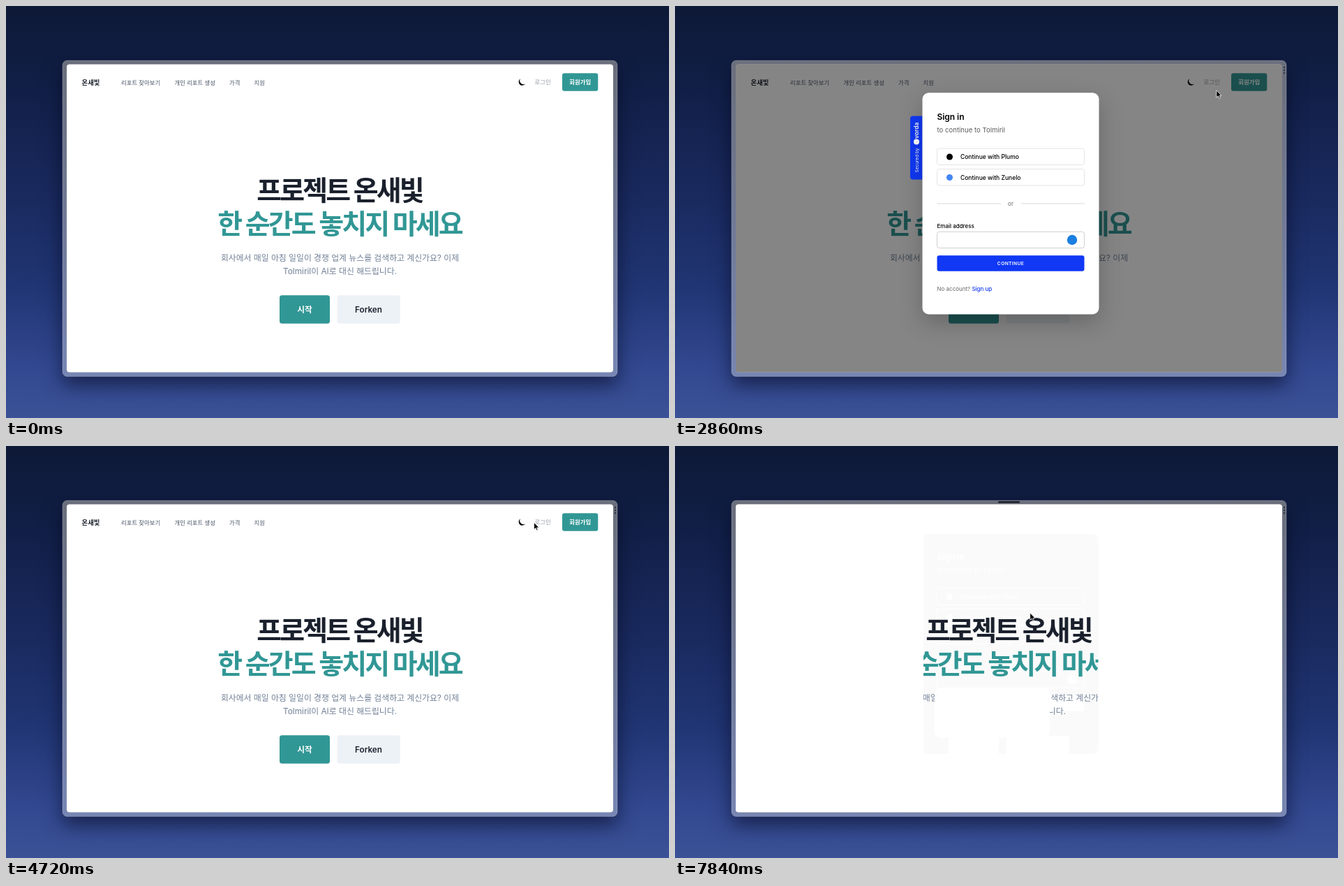
Animation of 950x590 px, one loop 8000 ms. Source, as an HTML page:

```html
<!DOCTYPE html>
<html lang="ko">
<head>
<meta charset="utf-8">
<title>프로젝트 온새빛</title>
<style>
  html, body { margin: 0; width: 100%; height: 100%; overflow: hidden; background: #0e1a3a; }
  svg { display: block; width: 950px; height: 590px; }
  text { font-family: Inter, "Noto Sans CJK KR", "Noto Sans CJK", sans-serif; white-space: pre; }
  .mid { text-anchor: middle; }
  .nav { font-size: 8.4px; font-weight: 500; fill: #4a5568; }
  .hero { font-size: 39px; font-weight: 700; letter-spacing: -2.85px; text-anchor: middle; }
  .lead { font-size: 11.85px; fill: #718096; text-anchor: middle; }
  .button { font-weight: 600; font-size: 11.7px; text-anchor: middle; }
  .card { fill: #fff; filter: drop-shadow(0 12px 16px rgba(0, 0, 0, .22)); }
  .title { font-size: 12px; font-weight: 600; letter-spacing: -.05px; }
  .sub { font-size: 9.6px; fill: #5c5c5c; }
  .box { fill: #fff; stroke: #e4e4e4; }
  .field { fill: #fff; stroke: #cfcfcf; }
  .social { font-size: 8.5px; font-weight: 500; }
  .label { font-size: 8px; font-weight: 500; }
  .small { font-size: 8px; fill: #666; }
  .link { fill: #1038f5; font-weight: 500; }
  .primary, .tab { fill: #1038f5; }
  .submit { font-size: 6.7px; font-weight: 600; letter-spacing: .35px; fill: #fff; text-anchor: middle; }
  .rule { stroke: #d8d8d8; }
  .entry { font-size: 8.8px; font-weight: 500; fill: #fff; }
  .address { font-size: 7.5px; fill: #b9b9b9; }
  .ghost * { fill: #fff; }
  .ghost .card { fill: #fafafa; filter: none; }
  .ghost .tab, .ghost .badge { display: none; }
  .ghost .box, .ghost .field, .ghost .rule { stroke: #fff; fill: none; }
</style>
</head>
<body>
<svg viewBox="0 0 950 590">
  <defs>
    <linearGradient id="sky" x2="0" y2="1">
      <stop offset="0" stop-color="#0d1936"/>
      <stop offset=".2" stop-color="#111f47"/>
      <stop offset=".45" stop-color="#19295d"/>
      <stop offset=".68" stop-color="#203573"/>
      <stop offset=".88" stop-color="#324890"/>
      <stop offset="1" stop-color="#3b5297"/>
    </linearGradient>
    <linearGradient id="bezel" x2="0" y2="1">
      <stop offset="0" stop-color="#6b6f7c"/>
      <stop offset=".5" stop-color="#707996"/>
      <stop offset="1" stop-color="#7886b3"/>
    </linearGradient>
    <clipPath id="screen"><rect x="87" y="83.5" width="783" height="441" rx="4"/></clipPath>
    <clipPath id="ghostArea"><rect x="356" y="126" width="250.5" height="315" rx="8"/></clipPath>
  </defs>

  <rect width="950" height="590" fill="url(#sky)"/>
  <rect x="81" y="78" width="795" height="452.500" rx="6.500" fill="url(#bezel)" stroke="#fff" stroke-opacity=".22"
        style="filter:drop-shadow(0 12px 14px rgba(0,0,20,.55))"/>
  <g id="grip" fill="#30353f">
    <circle cx="873" cy="88" r="1.200"/><circle cx="873" cy="92" r="1.200"/><circle cx="873" cy="96" r="1.200"/>
  </g>
  <rect id="handle" x="463" y="79" width="31" height="2.500" rx="1.200" fill="#191d28"/>

  <g clip-path="url(#screen)">
    <rect x="87" y="83" width="783" height="442" fill="#fff"/>
    <text x="108.500" y="112.700" font-size="9.400" font-weight="700" fill="#1a202c">온새빛</text>
    <g class="nav">
      <text x="165" y="112.500">리포트 찾아보기</text>
      <text x="241.500" y="112.500">개인 리포트 생성</text>
      <text x="320" y="112.500">가격</text>
      <text x="355.500" y="112.500">지원</text>
      <text x="757.500" y="112" fill="#969ba6" style="fill:#969ba6">로그인</text>
    </g>
    <path d="M737.200 104.300A5 5 0 1 0 743.900 111.200A4.900 4.900 0 0 1 737.200 104.300Z"/>
    <rect x="797" y="96.300" width="51.300" height="25.500" rx="3" fill="#319795"/>
    <text class="mid" x="822.700" y="112" font-size="8.400" font-weight="600" fill="#fff">회원가입</text>
    <g id="hero">
      <text class="hero" x="478" y="278" fill="#1a202c">프로젝트 온새빛</text>
      <text class="hero" x="478" y="326" fill="#319795">한 순간도 놓치지 마세요</text>
      <text class="lead" x="478.500" y="364.500">회사에서 매일 아침 일일이 경쟁 업계 뉴스를 검색하고 계신가요? 이제</text>
      <text class="lead" x="478.500" y="384">Tolmiril이 AI로 대신 해드립니다.</text>
    </g>
    <rect x="392" y="414.200" width="72" height="40.500" rx="3.500" fill="#319795"/>
    <text class="button" x="428" y="438.700" fill="#fff">시작</text>
    <rect x="474.500" y="414.200" width="90.300" height="40.500" rx="3.500" fill="#edf2f7"/>
    <text class="button" x="519.500" y="438.700" fill="#1a202c">Forken</text>

    <rect id="dim" x="87" y="83" width="783" height="442"/>
    <g id="signUp"></g>
    <g id="signIn"></g>
    <g id="popup">
      <rect x="375" y="347" width="158.500" height="66" rx="4" fill="#262626"
            style="filter:drop-shadow(0 3px 5px rgba(0,0,0,.16))"/>
      <rect x="388.500" y="356.700" width="19" height="19" rx="3" fill="#f0dd9c"/>
      <text class="mid" x="398" y="369" font-size="7.500" font-weight="600" fill="#857b5c">bu</text>
      <text class="entry" x="414.500" y="364">bulletins.zuq.test</text>
      <text class="address" x="414.500" y="374">me@zu.test</text>
      <circle cx="398" cy="394" r="8.500" fill="#fff"/>
      <text class="entry" x="414.500" y="392">Norvane</text>
      <text class="address" x="414.500" y="402">me@zu.test</text>
    </g>

    <g id="blank">
      <rect x="87" y="83" width="783" height="442" fill="#fff"/>
      <g class="ghost" clip-path="url(#ghostArea)">
        <g id="ghostModal"></g>
        <use href="#hero"/>
        <rect x="372" y="346" width="165" height="72" rx="9"/>
        <rect x="392" y="415" width="72" height="26"/>
        <rect x="475" y="415" width="90" height="26"/>
      </g>
    </g>
  </g>
  <path id="cursor" d="M0 0V10.200L2.400 8L4 11.600L5.700 10.900L4.200 7.400H7.300Z" stroke="#fff" stroke-width=".8"/>
</svg>

<script>
  const LOOP = 8000;
  const $ = id => document.getElementById(id);

  const box = (cls, y, h) => `<rect class="${cls}" x="375.5" y="${y}" width="211" height="${h}" rx="3"/>`;
  const text = (cls, x, y, s) => `<text class="${cls}" x="${x}" y="${y}">${s}</text>`;
  const social = (y, color, name) => box('box', y, 23.5) +
    `<circle cx="393.5" cy="${y + 12}" r="4.5" fill="${color}"/>` +
    text('social', 409, y + 15, `Continue with ${name}`);
  const submit = y => box('primary', y, 22.5) + text('submit', 481, y + 13.7, 'CONTINUE');

  const modal = (height, title, body) => `
    <path class="tab" d="M354.500 157.500H341a4 4 0 0 0-4 4V244.500a4 4 0 0 0 4 4H354.500Z"/>
    <g class="badge" fill="#fff">
      <circle cx="346" cy="194.500" r="4"/>
      <text transform="translate(348.500 238.500) rotate(-90)" font-size="6.500">Secured by</text>
      <text transform="translate(349 190) rotate(-90)" font-size="8.500" font-weight="600">vorda</text>
    </g>
    <rect class="card" x="354.500" y="124.300" width="253" height="${height}" rx="9"/>
    ${text('title', 375.5, 163.3, title)}
    ${text('sub', 375.5, 180.8, 'to continue to Tolmiril')}
    ${social(204, '#000', 'Plumo')}
    ${social(233.5, '#4285f4', 'Zunelo')}
    <path class="rule" d="M375.500 283H467M496 283H587"/>
    ${text('small mid', 481, 286, 'or')}
    ${text('label', 375.5, 317.5, 'Email address')}
    ${box('field', 323.3, 23.3)}
    ${body}`;

  const footer = (y, question, linkText) =>
    text('small', 375.5, y, `${question} <tspan class="link">${linkText}</tspan>`);

  $('signUp').innerHTML = modal(365, 'Create your account', `
    ${text('label', 375.5, 365.5, 'Password')}
    ${box('field', 371.3, 23.3)}
    <path d="M566.500 383Q571.500 376.500 576.500 383Q571.500 389.500 566.500 383Z" fill="#999"/>
    <circle cx="571.500" cy="383" r="1.700" fill="#999" stroke="#fff"/>
    ${submit(405)}${footer(456, 'Have an account?', 'Sign in')}`);
  const signInMarkup = modal(317.2, 'Sign in', `
    <circle cx="569" cy="335" r="7.200" fill="#1a7fe0"/>
    ${submit(357.3)}${footer(408, 'No account?', 'Sign up')}`);
  $('signIn').innerHTML = signInMarkup;
  $('ghostModal').innerHTML = signInMarkup;

  // [time, x, y] of the pointer tip
  const path = [
    [320, 917, 220], [680, 834, 114], [1440, 834, 114], [1800, 814, 184.5], [2200, 814, 184.5],
    [2400, 769, 108], [2700, 769, 108], [2960, 779, 127], [3660, 779, 127], [3980, 800, 122],
    [4200, 837, 112], [4360, 837, 112], [4600, 742, 100], [4720, 756.5, 109.5], [4940, 756.5, 109.5],
    [5280, 576, 236], [5600, 780, 100], [5720, 766, 107], [5800, 766, 107], [5980, 662.5, 212.5],
    [6300, 530, 222], [6620, 530, 222], [7100, 508.7, 239]
  ];

  const ramp = (t, a, b) => Math.min(1, Math.max(0, (t - a) / (b - a)));
  const mix = (a, b, k) => a + (b - a) * k;

  function pointer(t) {
    const next = path.findIndex(p => p[0] > t);
    if (next < 0) return path[path.length - 1].slice(1);
    if (next === 0) return path[0].slice(1);
    const [a, b] = [path[next - 1], path[next]];
    const k = ramp(t, a[0], b[0]), eased = k * k * (3 - 2 * k);
    return [mix(a[1], b[1], eased), mix(a[2], b[2], eased)];
  }

  const fade = (id, opacity) => $(id).setAttribute('opacity', opacity);

  // Opens with an ease-out zoom, closes with a linear one; returns the opacity.
  function showModal(id, t, cy, open, close) {
    const shown = ramp(t, open, open + 200), gone = ramp(t, close, close + 200);
    const scale = 1 - .05 * ((1 - shown) ** 2 + gone);
    $(id).setAttribute('transform', `translate(481 ${cy}) scale(${scale}) translate(-481 ${-cy})`);
    fade(id, shown * (1 - gone));
    return shown * (1 - gone);
  }

  function draw(t) {
    const up = showModal('signUp', t, 306.8, 815, 1980);
    const first = t < 4500;
    const inn = showModal('signIn', t, 282.9, first ? 2440 : 5836, first ? 3600 : LOOP);
    fade('dim', .48 * Math.max(up, inn));
    fade('popup', first ? ramp(t, 3160, 3260) * (1 - ramp(t, 3580, 3640)) : ramp(t, 6640, 6740));
    fade('blank', ramp(t, 7460, 7700));
    fade('grip', +(t >= 320));
    fade('handle', +(t >= 6800));
    fade('cursor', +(t >= 320));
    $('cursor').setAttribute('transform', `translate(${pointer(t)})`);
  }

  function frame() {
    draw(performance.now() % LOOP);
    requestAnimationFrame(frame);
  }
  frame();
</script>
</body>
</html>
```
